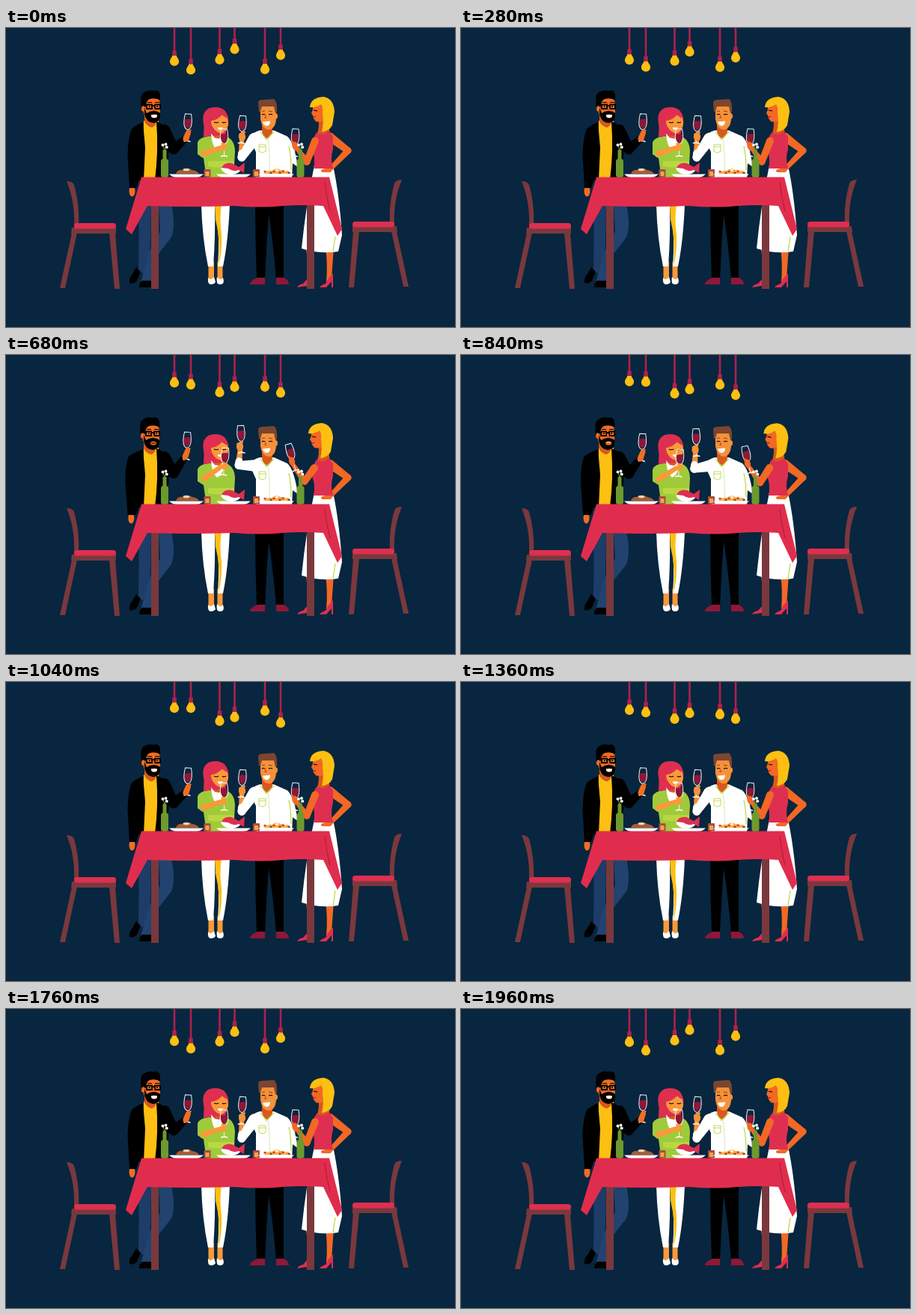
These frames come from a looping animation (600x400 px, 2 s). An HTML page with a canvas:

```html
<!DOCTYPE html>
<html lang="en">
<head>
<meta charset="utf-8">
<title>Dinner toast</title>
<style>
html, body { margin: 0; width: 100%; height: 100%; overflow: hidden; background: #08263f; }
canvas { display: block; width: 600px; height: 400px; }
</style>
</head>
<body>
<canvas id="stage" width="600" height="400"></canvas>
<script>
const ctx = document.getElementById('stage').getContext('2d');
const LOOP = 2000, STEP = 40;
const C = {
  bg: '#08263f', cloth: '#e12d4d', fold: '#b01f40', wood: '#7a383d', red: '#de2f50', wire: '#b0204c',
  gold: '#fdbf12', amber: '#f36d22', peach: '#f9993a', tan: '#f5913a', coral: '#f26824', shade: '#d9581f',
  black: '#000000', white: '#ffffff', jean: '#1d3c68', jeanLit: '#22426f', green: '#9fcb3b',
  lime: '#bad743', leaf: '#6d9a2e', brown: '#7c4530', wine: '#8f1738'
};

const clamp = v => Math.max(0, Math.min(1, v));
const ease = (t, a, b) => { const k = clamp((t - a) / (b - a)); return k * k * (3 - 2 * k); };
const mix = (a, b, k) => a + (b - a) * k;
const mixPts = (a, b, k) => a.map((q, i) => [mix(q[0], b[i][0], k), mix(q[1], b[i][1], k)]);

function fill(d, color) {
  ctx.fillStyle = color;
  ctx.fill(new Path2D(d));
}
function line(d, color, w = 1) {
  ctx.strokeStyle = color;
  ctx.lineWidth = w;
  ctx.stroke(new Path2D(d));
}
function oval(x, y, rx, ry, color, turn = 0) {
  ctx.fillStyle = color;
  ctx.beginPath();
  ctx.ellipse(x, y, rx, ry, turn, 0, 7);
  ctx.fill();
}
function box(x, y, w, h, color, r = 0) {
  ctx.fillStyle = color;
  ctx.beginPath();
  ctx.roundRect(x, y, w, h, r);
  ctx.fill();
}
// Tapered limb segment with round ends
function limb([x1, y1], [x2, y2], w1, w2, color) {
  const a = Math.atan2(y2 - y1, x2 - x1);
  ctx.fillStyle = color;
  ctx.beginPath();
  ctx.arc(x1, y1, w1 / 2, a + Math.PI / 2, a - Math.PI / 2);
  ctx.arc(x2, y2, w2 / 2, a - Math.PI / 2, a + Math.PI / 2);
  ctx.fill();
}
function at(x, y, draw, turn = 0, sx = 1) {
  ctx.save();
  ctx.translate(x, y);
  ctx.rotate(turn);
  ctx.scale(sx, 1);
  draw();
  ctx.restore();
}

// Origin at the rim centre
function glass(x, y, turn = 0) {
  at(x, y, () => {
    fill('M-5 8Q0 6 5 7C5 14 3 19 0 19S-5 14-5 8Z', C.wine);
    line('M-4 0H4C6 10 6 20 0 21C-6 20-6 10-4 0ZM0 21V36', '#f3eef2', 1);
    line('M-4.5 37Q0 35 4.5 37', C.white, 1.5);
  }, turn);
}

function lamp(x, y) {
  box(x - 1.3, -2, 2.6, y - 11, C.wire);
  box(x - 2.8, y - 14, 5.6, 8, C.wire, 1);
  fill(`M${x - 2.8} ${y - 7}H${x + 2.8}Q${x + 3} ${y - 5} ${x + 5} ${y - 3}H${x - 5}Q${x - 3} ${y - 5} ${x - 2.8} ${y - 7}Z`, C.gold);
  oval(x, y + .7, 6.1, 6.1, C.gold);
}
// x, then heights at the start and at half the loop
const lamps = [[225, 44, 34.5], [247, 55.5, 34.5], [285.5, 42, 52], [305.5, 28, 47], [346, 55, 38.5], [367, 36, 54.5]];
function drawLamps(t) {
  const k = (1 - Math.cos(2 * Math.PI * t / LOOP)) / 2;
  for (const [x, a, b] of lamps) lamp(x, mix(a, b, k));
}

function chair() {
  fill('M88 274H95L79 348H72Z', C.wood);
  fill('M138 274H146L152 349H145Z', C.wood);
  fill('M81 205Q89 205 91 210C96 228 98 246 97 264H91C92 241 88 222 81 205Z', C.wood);
  fill('M88 267H147V275H87Z', C.wood);
  box(91, 261, 56, 7.5, C.red, 3.5);
}

function beardMan(p, smile) {
  fill('M177 236H194L193 290L189 330L177 326Q178 280 177 236Z', C.jean);
  fill('M204 236H221Q227 265 221 280L204 302L193 341H180L191 300L206 272Z', C.jeanLit);
  fill('M174 320L180 326L175 338Q171 343 165 341Q164 334 169 329Z', C.black);
  fill('M182 338H194V347H178Q178 341 182 338Z', C.black);

  const dx = -4 * p;
  oval(168.5 + dx * .3, 218, 4, 7.5, C.amber);
  fill('M184 124H204L201 203H182Z', C.gold);
  fill(`M183 126Q173 130 ${168 + dx} 135Q${163 + dx} 146 ${162.5 + dx * .8} 170L${165 + dx * .6} 214H174L177 204H184L186 160Z`, C.black);
  fill('M201 125Q213 129 219 139L217 172L211 203H199Q204 165 201 125Z', C.black);
  const [s, e, h] = mixPts([[211, 138], [224, 162], [239, 149]], [[211, 138], [224, 158], [238, 138]], p);
  limb(s, e, 18, 14, C.black);
  limb(e, h, 14, 9, C.black);

  at(-p, 0, () => {
    fill('M185 117H201V127Q198 133 194 133Q187 130 185 125Z', C.shade);
    fill('M184 94L205 92L206 112Q205 124 197 125Q187 124 184 114Z', C.amber);
    fill('M181 107Q179 91 182 88Q188 82 197 84Q204 82 206 89L206 97Q201 93 192 95Q187 97 186 108Z', C.black);
    oval(183.5, 108, 2.5, 3.8, C.amber);
    fill('M185 107L188 114Q192 111 197 111Q203 111 206 114Q207 126 197 127Q187 126 185 115Z', C.black);
    line('M185 104H188M188 102.5H195V108H188ZM199 102.5H206V108H199ZM195 104H199', C.black, 1.8);
    line('M189 99.5H195M199 99.5H205', C.black, 1.2);
    oval(191.7, 105, 1, .9, C.black);
    oval(202, 105, 1, .9, C.black);
    fill('M197 104L200 111H196Z', C.shade);
    oval(198, 118, 4, 2.6, C.amber);
    if (smile > .05) fill(`M194 116H202Q202 ${116 + 4 * smile} 198 ${116 + 4 * smile}T194 116Z`, C.white);
    else line('M195 118H201', C.black, 1);
  });

  const gx = mix(243.5, 242.5, p), gy = mix(115, 103, p);
  glass(gx, gy, .04);
  limb([gx - 3, gy + 33], [gx, gy + 25], 8, 7, C.amber);
  limb([gx - 1, gy + 24], [gx + 3, gy + 22], 3, 2.5, C.amber);
}

function redhead(p) {
  box(270.5, 312, 7.5, 25, C.peach, 2);
  box(282.5, 312, 7, 25, C.peach, 2);
  fill('M261 236H279Q280 278 277 319H270Q262 280 261 236Z', C.white);
  fill('M281 236H299Q297 285 290 319H283Q286 282 281 236Z', C.white);
  fill('M279 236H288Q285 255 288 276Q289 300 284 318Q287 285 280 256Z', C.gold);
  fill('M270 334Q274 339 278 333L280 340Q278 343 274 343Q269 343 270 334Z', C.white);
  fill('M282 333Q286 339 290 334Q293 343 286 343Q280 343 282 333Z', C.white);

  fill('M270 145Q259 146 256 153L256 169L264 174L268 203H304L306 164Q305 148 293 145Z', C.green);
  fill('M270 178H305V185Q288 188 270 185Z', C.lime);
  fill('M276 134H288V153Q281 158 275 150Z', C.shade);
  fill('M264 146Q267 139 264 128Q261 112 272 107Q284 104 292 110Q299 118 297 130L293 143L272 145Z', C.red);
  fill('M273 125L288 116L296 121L297 129Q295 139 287 141Q277 139 273 125Z', C.peach);
  fill('M265 121Q267 107 281 106Q293 107 297 121Q291 119 289 116Q283 123 274 124L275 140Q271 146 264 145Z', C.red);
  line('M278 126Q281 127.5 284 126M289 126Q291 127.5 294 126', C.black, 1.2);
  fill('M283 133H290Q289 136.5 286 136.5Q283 136 283 133Z', C.white);
  fill('M274 141L279 147L285 148L290 143L291 150Q289 161 282 164Q275 158 274 141Z', C.white);

  const [s, e, h] = mixPts([[262, 154], [264, 168], [287, 160]], [[262, 154], [265, 165], [288, 149]], p);
  limb(s, e, 11, 11, C.green);
  limb(e, h, 8, 6, C.peach);
  const gx = mix(291.5, 293.5, p), gy = mix(135, 124, p);
  glass(gx, gy, .08 * p);
  oval(gx - 1, gy + 25, 4, 4.5, C.peach);
  limb([gx - 3, gy + 20], [gx + 2, gy + 22], 2.6, 2.6, C.peach);
}

function shirtMan(p) {
  fill('M333 236H352Q348 285 346 336H335Q333 285 333 236Z', C.black);
  fill('M349 236H371Q371 285 371 336H361Q357 285 349 236Z', C.black);
  fill('M336 334H346V343H326Q326 338 336 334Z', C.wine);
  fill('M361 334H371Q378 337 378 343H361Z', C.wine);

  fill('M339 137Q328 140 326 148L334 166V203H382L383 181L390 186Q385 153 376 145L358 137Z', C.white);
  line('M378 158Q381 170 381 190', C.lime, 1.2);
  line('M350 147Q353 168 352 201', '#d5df9c', .8);
  line('M338 156H347V165L342.5 167L338 165ZM338 159H347', C.lime, .9);
  fill('M342 127H356V139Q354 146 349 148Q343 145 342 138Z', C.shade);
  line('M340 139L348 149L358 139', C.lime, 1.2);
  fill('M340 105H361V122Q360 135 351 136Q342 135 340 122Z', C.tan);
  fill('M338 112L337 100Q337 96 343 96L358 95Q363 98 362 113L360 114L358 105H342L340 112Z', C.brown);
  oval(361, 118, 2, 3.4, C.tan);
  line('M342 116Q344 114.5 346 116M351 116Q354 114.5 356 116', C.black, 1.1);
  line('M342 111.5L346 111M351 111L356 112', C.brown, 1.1);
  fill('M347 115L348.5 121H345Z', C.shade);
  fill('M343 125.5L353 124.5Q353 131 348 131Q344 130 343 125.5Z', C.white);

  const [s, e, h] = mixPts([[332, 148], [315, 173], [315, 149]], [[334, 148], [311, 147], [313, 124]], p);
  limb(e, h, 9, 6, C.tan);
  limb(s, e, 16, 11, C.white);
  limb(e, [mix(e[0], h[0], .22), mix(e[1], h[1], .22)], 11, 10, C.white);
  const gx = mix(316.5, 313.5, p), gy = mix(117.5, 94, p);
  glass(gx, gy, .06 - .1 * p);
  oval(gx - 1, gy + 28, 4.6, 6, C.tan);
  limb([gx - 4, gy + 25], [gx + 2, gy + 22], 3, 3, C.tan);
}

function blonde(p) {
  fill('M401 294H412L408 338L402 342Q404 318 401 294Z', C.coral);
  fill('M427 294H438L435 335L428 340Q430 315 427 294Z', C.coral);
  fill('M404 334L408 337L402 345L389 347Q391 343 397 342Z', C.red);
  fill('M430 336L437 328V347H435V339L428 347H419Q421 344 427 342Z', C.red);
  fill('M412 184H437Q445 220 449 277L444 299Q420 303 395 295Q401 235 412 184Z', C.white);
  line('M440 279L437 299', C.lime, 1.2);

  fill('M417 120H430L433 143L414 145Q420 134 417 120Z', C.shade);
  limb([433, 146], [457, 164], 12, 9, C.coral);
  limb([457, 164], [432, 190], 9, 6, C.coral);
  limb([432, 190], [423, 191], 6, 4, C.coral);
  fill('M415 140Q424 145 431 138L437 145V162Q433 174 437 188H411Q414 175 409 162Q409 148 415 140Z', C.red);
  at(-2 * p, -p, () => {
    fill('M410 103L424 99L427 122Q422 127 414 125L411 121L410 117L408 114L410 109Z', C.coral);
    fill('M406 106Q407 93 424 92Q438 94 439 112L436 130Q432 138 422 139Q425 127 423 113Q424 106 421 102Q414 107 406 106Z', C.gold);
    line('M411 110L416 111', C.black, 1.2);
    line('M410 119L414 118.5', C.wine, 1.2);
  });

  const [s, e, h] = mixPts([[413, 151], [402, 179], [388, 160]], [[412, 151], [399, 169], [382, 144]], p);
  limb(s, e, 10, 9, C.coral);
  limb(e, h, 9, 5, C.coral);
  glass(mix(387, 377, p), mix(135, 119, p), mix(.04, -.28, p));
  const hx = mix(386.5, 382, p), hy = mix(158, 142, p);
  oval(hx, hy, 4, 6, C.coral, -.3);
  limb([hx - 2, hy - 2], [hx - 4, hy - 6], 3, 2.5, C.coral);
}

function bottle(x) {
  line(`M${x} 165L${x - 2} 157M${x} 165L${x + 2} 156`, C.leaf, 1);
  for (const [dx, y] of [[-2.5, 156.5], [1.5, 155.5], [2.8, 159.5]]) oval(x + dx, y, 1.9, 1.9, C.white);
  box(x - 2.5, 163, 5, 18, C.leaf, 1);
  box(x - 5, 175, 10, 25, C.leaf, 3.5);
}
function candle(x) {
  box(x - 4.5, 189, 9, 10.5, '#a4503c', 1);
  box(x - 2.5, 192, 5, 6, '#f6a14a');
}
function plate(x1, x2) {
  fill(`M${x1} 195.5H${x2}Q${x2 - 5} 200 ${x2 - 10} 200H${x1 + 10}Q${x1 + 5} 200 ${x1} 195.5Z`, C.white);
}

function table() {
  box(194, 236, 10, 113, C.wood);
  box(402, 236, 10, 113, C.wood);
  bottle(212);
  bottle(393.5);
  plate(218, 264);
  fill('M227 195Q229 189 237 190Q243 186 249 190Q256 191 258 195Z', '#a95b31');
  oval(241, 189.5, 4.5, 1.8, '#f3d3b0');
  candle(269);
  plate(281, 327);
  fill('M287 188Q300 181 315 188Q311 196 301 196Q290 195 287 188Z', C.white);
  fill('M288 187Q292 179 302 181L311 186L319 180L318 194L311 190Q304 193 297 188Z', C.red);
  candle(334.5);
  plate(337, 385);
  fill('M344 195Q348 189 355 191Q361 186 367 190Q377 189 381 195Z', '#f8b04a');
  for (let i = 0; i < 9; i++) {
    oval(346 + i * 4, 192 - 2 * Math.sin(i * 2.1), 1.7, 1.2, [C.red, C.white, C.brown][i % 3]);
  }
  fill('M181 199.5H432L449 269L443 278L424 238Q395 236 370 238Q340 241 305 238Q245 240 189 238L168 276L160 269Z', C.cloth);
  line('M426 206Q428 226 433 245', C.fold, 1.2);
}

function render(t) {
  const p = ease(t, 440, 700) * (1 - ease(t, 760, 1040));
  const smile = 1 - ease(t, 320, 440) + ease(t, 800, 960);
  ctx.fillStyle = C.bg;
  ctx.fillRect(0, 0, 600, 400);
  drawLamps(t);
  chair();
  at(610, -2, chair, 0, -1);
  beardMan(p, smile);
  redhead(p);
  shirtMan(p);
  blonde(p);
  table();
}

const start = performance.now();
function tick() {
  const t = (performance.now() - start) % LOOP;
  render(Math.floor(t / STEP) * STEP);
  requestAnimationFrame(tick);
}
tick();
</script>
</body>
</html>
```
